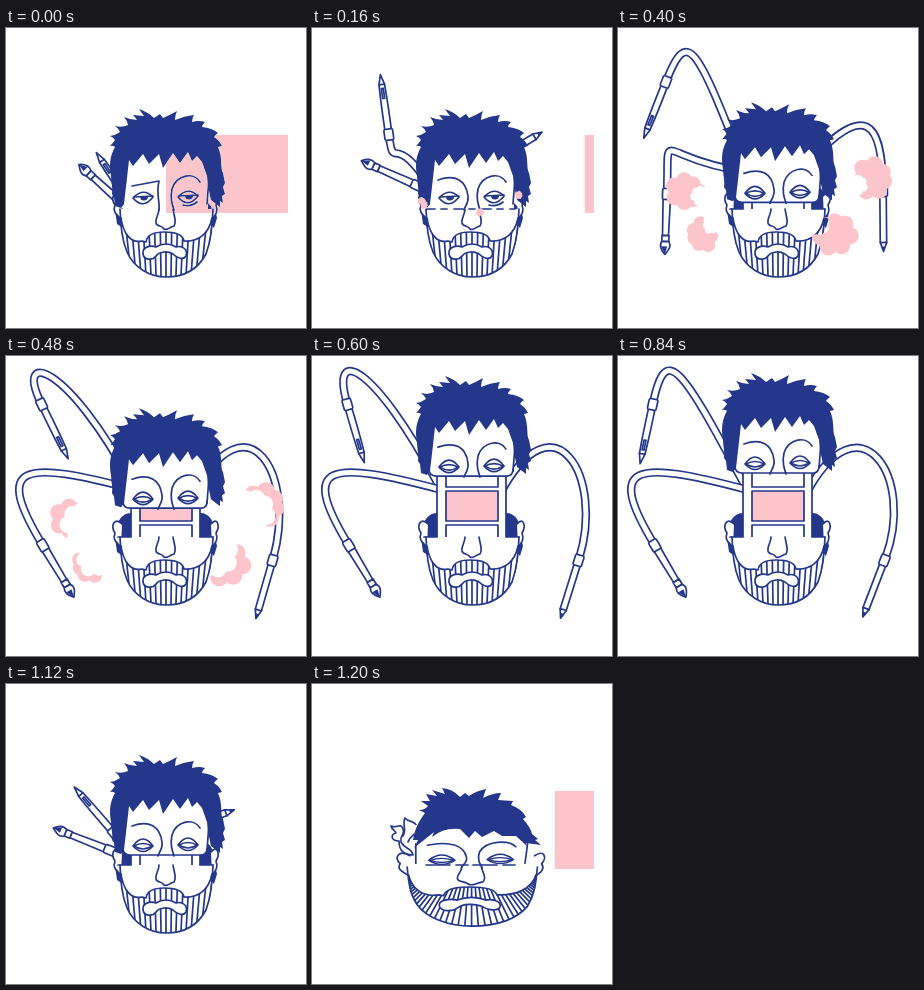
These frames come from a looping animation (300x300 px, 1240 ms). An HTML page:

```html
<!DOCTYPE html>
<html lang="en">
<head>
<meta charset="utf-8">
<title>Open mind</title>
<style>
  html, body { margin: 0; width: 100%; height: 100%; overflow: hidden; background: #fff; }
  svg { display: block; width: 100vw; height: 100vh; isolation: isolate; }
  .line { fill: none; }
  .ink { fill: #24378a; stroke: none; }
  .pink { fill: #fcc5cc; }
  #art path, #art rect { vector-effect: non-scaling-stroke; }
  #screen { mix-blend-mode: darken; }
</style>
</head>
<body>
<svg viewBox="0 0 300 300">
  <defs>
    <clipPath id="beardClip">
      <path d="M115 190C117 204 124 216 136 213L140 214C141 207 147 204 158 204C170 204 177 207 178 213C192 214 203 206 206 190C206 206 205 214 200 226C192 241 178 249 160 249C144 249 128 240 121 224C117 212 115 200 115 190Z"/>
    </clipPath>
    <mask id="wear" maskUnits="userSpaceOnUse" x="0" y="0" width="300" height="300">
      <rect width="300" height="300" fill="#fff"/>
      <g id="holes"></g>
    </mask>
    <g id="openEye">
      <path d="M127 170Q137 159 147 169Q137 182 127 170Z"/>
      <path class="line" d="M128 169L147 168"/>
      <path class="ink" d="M134 169A4 4 0 0 0 142 168Z"/>
    </g>
    <g id="shutEye">
      <path d="M127 172Q137 158 147 172Q137 183 127 172Z"/>
      <path class="line" d="M128 172Q137 167 146 172Q137 178 128 172"/>
    </g>
  </defs>
  <rect width="300" height="300" fill="#fff"/>
  <g id="art" fill="#fff" stroke="#24378a" stroke-width="1.7" stroke-linejoin="round" stroke-linecap="round">
    <g id="arms"></g>
    <g id="curls">
      <path d="M91 152C95 146 90 140 93 134C97 139 105 136 105 145C104 152 98 151 96 158"/>
      <path d="M79 142C84 145 89 138 91 145C94 151 87 151 89 158C93 166 99 163 101 171C89 171 87 164 87 157C79 157 78 150 84 149C83 146 80 146 79 142Z"/>
    </g>
    <g id="inside">
      <path class="ink" d="M111 182C108 168 115 157 125 157H195C206 158 210 170 207 182Z"/>
      <path d="M125 110H194V183H125Z"/>
      <path d="M134 100H186V131H134Z M134 169H186V183H134Z"/>
      <path class="pink" d="M134 135H186V165H134Z"/>
    </g>
    <g id="lower">
      <path id="locks" class="ink" d="M109 182L111 196L117 200L116 182Z M202 175L202 193L208 200L211 190L209 182Z"/>
      <path d="M116 168C108 160 104 171 109 177C106 185 112 187 115 191"/>
      <path d="M205 168C212 160 214 171 210 177C213 185 208 188 206 191"/>
      <path d="M114 181C115 200 116 212 121 224C128 240 144 249 160 249C178 249 192 241 200 226C205 212 206 200 207 181"/>
      <g clip-path="url(#beardClip)"><path id="beard" class="line"/></g>
      <path class="line" d="M115 190C117 204 124 216 136 213L140 214C141 207 147 204 158 204C170 204 177 207 178 213C192 214 203 206 206 190"/>
      <path d="M137 226C136 219 144 217 150 219C156 215 164 215 170 219C177 217 182 222 180 228C177 233 170 229 167 226C162 223 154 223 150 228C146 233 138 232 137 226Z"/>
      <path class="line" d="M153 181C153 187 149 190 150 195C151 199 156 197 158 201C162 203 163 199 168 198C171 194 168 188 167 181"/>
    </g>
    <g id="face">
      <path stroke="none" d="M115 125L117 150V176Q118 181 124 181H196Q201 181 201 175L203 150L205 125Z"/>
      <path class="line" d="M117 150V176 M203 150L201 176"/>
      <path id="jaw" class="line" d="M117 174Q117 181 124 181H195Q201 181 201 174"/>
      <path id="brow" class="line"/>
      <path class="line" d="M194 154C188 144 171 146 166 161C164 170 166 176 168 182"/>
      <g id="open">
        <use href="#openEye"/><use href="#openEye" x="45" y="-1"/>
        <path class="line" d="M177 177Q185 179 191 174"/>
      </g>
      <g id="shut"><use href="#shutEye"/><use href="#shutEye" x="45" y="-1"/></g>
    </g>
    <path id="cut" class="line"/>
    <path id="hair" class="ink" d="M115 180L109 178L108 169L106 166C107 160 105 154 105 148C103 136 104 128 109 119Q107 117 104 118Q107 115 109 112Q107 109 104 108Q110 107 114 104Q112 100 109 98Q116 100 122 97Q121 92 118 89Q125 92 131 92Q129 89 127 87L138 88Q135 84 133 81Q142 84 148 90L154 86L157 90Q164 87 171 83Q169 87 169 92Q178 88 188 87Q186 90 186 94Q193 92 199 94Q196 97 196 99Q206 100 212 105Q209 107 208 109Q213 112 216 118L212 119C217 130 214 140 217 145L219 155L217 159L219 166L216 168L217 175L214 173L214 179L205 172L202 158L201 148L196 134L191 128L186 133L182 124L174 135L167 125L157 140L153 126L143 136L137 126L127 138L123 132L121 150L118 176Z"/>
    <path id="flatHair" class="ink" d="M102 164L106 156L101 156C103 144 107 137 113 129L107 126Q113 126 116 122L109 117L118 117L114 110L125 112Q122 108 120 106L133 110L130 104Q141 105 148 113L153 109L157 112Q164 107 174 105L171 114Q181 109 189 109L186 116L201 117L199 121Q210 125 214 133L211 135Q219 144 220 150L226 155L223 156L229 161L214 159L216 163L204 152L190 152L182 147L170 153L163 147L157 154L148 145Q132 143 120 153L122 148Z"/>
  </g>
  <g id="puffs" mask="url(#wear)"></g>
  <rect id="screen" class="pink" y="107" height="78"/>
</svg>
<script>
const $ = id => document.getElementById(id);
const LOOP = 1240, STEP = 40, TOOL = 62;
const clamp = k => Math.max(0, Math.min(1, k));
const span = (a, b, t) => clamp((t - a) / (b - a));
const smooth = (a, b, t) => { const k = span(a, b, t); return k * k * (3 - 2 * k); };
const mix = (a, b, k) => a.map((v, i) => v + (b[i] - v) * k);
const polar = ([x, y], deg, r) => [x + r * Math.cos(deg * Math.PI / 180), y + r * Math.sin(deg * Math.PI / 180)];
const show = (id, on) => $(id).style.display = on ? '' : 'none';

// a pose is the tool's base x and y, its heading, and the heading of the tube at the root
const ARMS = [
  { tool: 'pen', root: [126, 172], sink: 44, curl: .5, swing: 38,
    home: [125, 176, 236, 236], peek: [77, 108, 262, 240], lift: [62, 58, 159, 255],
    spread: [35, 47, 64, 242], retreat: [60, 72, 209, 255] },
  { tool: 'brush', root: [130, 174], sink: 40, curl: .85, swing: 0,
    home: [119, 178, 222, 222], peek: [106, 158, 204, 200], lift: [62, 141, 125, 180],
    spread: [36, 188, 59, 195], retreat: [63, 133, 140, 230] },
  { tool: 'pencil', root: [188, 138], sink: 0, curl: .85, swing: 5,
    home: [148, 150, -31, -31], peek: [177, 136, -31, -31], lift: [263, 120, 73, -35],
    spread: [267, 203, 106, -62], retreat: [235, 135, 16, -10] }
];
const PHASES = [[0, 'home'], [160, 'peek'], [320, 'lift'], [480, 'spread'],
  [840, 'spread'], [1000, 'retreat'], [1160, 'home']];

// birthplace, drift and growth
const PUFFS = [
  { from: [110, 173], drift: [-44, -10], grow: 17 },
  { from: [112, 177], drift: [-30, 32], grow: 14 },
  { from: [168, 184], drift: [52, 22], grow: 19 },
  { from: [207, 167], drift: [52, -18], grow: 18 }
];

const TOOLS = {
  pen: n => `<path d="M0 -3.2Q${n / 2} -3.6 ${n - 10} -2.8L${n} 0L${n - 10} 2.8Q${n / 2} 3.6 0 3.2Z"/>
    <path d="M${n - 10} -2.8V2.8M${n - 24} -1H${n - 14}V1H${n - 24}Z"/>`,
  brush: n => `<path d="M0 -3.8L${n - 19} -3V3L0 3.8Z"/><path d="M${n - 19} -3.5H${n - 13}V3.5H${n - 19}Z"/>
    <path d="M${n - 13} -3.5C${n - 8} -7 ${n - 4} -3 ${n} 0C${n - 4} 4 ${n - 9} 6 ${n - 13} 3.5Z"/>
    <path class="ink" d="M${n - 8} -2L${n} 0L${n - 8} 4Z"/>`,
  pencil: n => `<path d="M0 -3.2H${n - 9}L${n} 0L${n - 9} 3.2H0Z"/><path d="M${n - 9} -3.2V3.2"/>
    <path class="ink" d="M${n - 5} -2L${n} 0L${n - 5} 2Z"/>`
};

function drawArm(arm, t) {
  let i = PHASES.length - 2;
  while (PHASES[i][0] > t) i--;
  const [[t0, a], [t1, b]] = [PHASES[i], PHASES[i + 1]];
  const [x, y, aim, launch] = mix(arm[a], arm[b], span(t0, t1, t));
  const heading = aim + arm.swing * smooth(480, 840, t) * (1 - span(840, 1000, t));
  const lift = span(160, 480, t) - span(840, 1000, t);
  const root = [arm.root[0], arm.root[1] - arm.sink * lift], base = [x, y];
  const gap = Math.hypot(x - root[0], y - root[1]);
  const d = `M${root}C${polar(root, launch, gap * 1.12)} ${polar(base, heading, -gap * arm.curl)} ${base}`;
  return `<path class="line" stroke-width="8.4" d="${d}"/><path class="line" stroke="#fff" stroke-width="5" d="${d}"/>
    <g transform="translate(${base}) rotate(${heading})">${TOOLS[arm.tool](TOOL)}
    <rect x="-4" y="-4.4" width="11" height="8.8" rx="1.5"/></g>`;
}

function blob([x, y], r, fill, seed) {
  let s = `<circle cx="${x}" cy="${y}" r="${r * .75}" fill="${fill}"/>`;
  for (let i = 0; i < 7; i++) {
    const [cx, cy] = polar([x, y], i * 360 / 7 + seed * 57, r * (.6 + .12 * Math.sin(i * 5 + seed)));
    s += `<circle cx="${cx}" cy="${cy}" r="${r * .4}" fill="${fill}"/>`;
  }
  return s;
}

function drawPuffs(t) {
  const k = span(160, 480, t), out = 1 - (1 - k) ** 2, fade = (t - 320) / 160;
  let cloud = '', holes = '';
  if (t >= 160 && t < 600) PUFFS.forEach(({ from, drift, grow }, n) => {
    const r = 4 + grow * out, centre = from.map((v, i) => v + drift[i] * out);
    const hole = centre.map((v, i) => v - drift[i] * (.42 - .2 * fade));
    cloud += blob(centre, r, '#fcc5cc', n);
    if (fade > 0) holes += blob(hole, r * fade, '#000', n + 2);
  });
  $('puffs').innerHTML = cloud;
  $('holes').innerHTML = holes;
}

// the flattened head fans its beard out sideways
function drawBeard(flat) {
  const reach = flat ? 154 : 44, top = flat ? .3 : 1.08;
  let d = '';
  for (let x = -reach; x <= reach; x += 5.5)
    d += `M${160 + x * top} 185L${160 + x * .9} 251`;
  $('beard').setAttribute('d', d);
}

function draw(ms) {
  let t = Math.floor(ms % LOOP / STEP) * STEP;
  if (t === 40 || t === 1040) t -= STEP;
  const flat = t >= 1160, awake = t < 200;
  const rise = -64 * (smooth(340, 640, t) - smooth(1000, 1160, t)), split = rise < 0;
  const squash = (sx, sy) => flat ? `translate(161 183) scale(${sx} ${sy}) translate(-161 -181)` : '';

  $('arms').innerHTML = flat ? '' : ARMS.map(arm => drawArm(arm, t)).join('');
  show('curls', flat);
  show('flatHair', flat);
  show('hair', !flat);
  show('locks', !flat);
  show('inside', split);
  show('jaw', split);
  show('open', awake);
  show('shut', !awake);
  $('lower').setAttribute('transform', squash(1.4, .87));
  $('face').setAttribute('transform', `translate(0 ${rise}) ` + squash(1.3, .75));
  $('hair').setAttribute('transform', `translate(0 ${rise})`);
  $('brow').setAttribute('d', t < 120
    ? 'M126 158L153 153C150 166 154 174 153 182'
    : 'M126 152C143 146 154 152 156 168C157 175 153 178 152 182');
  $('cut').setAttribute('d', split ? 'M112 181H125M194 181H207' : 'M114 181H203');
  $('cut').setAttribute('stroke-dasharray', flat ? '24 6 12 5' : awake ? '9 6 6 7' : 'none');
  show('cut', t >= 120);
  drawBeard(flat);
  drawPuffs(t);

  const width = 122 * (span(200, 0, t) ** 1.6 + span(1120, LOOP, t) ** 2.8);
  $('screen').setAttribute('x', 282 - width);
  $('screen').setAttribute('width', width);
}

const start = performance.now();
(function tick() {
  draw(performance.now() - start);
  requestAnimationFrame(tick);
})();
</script>
</body>
</html>
```
